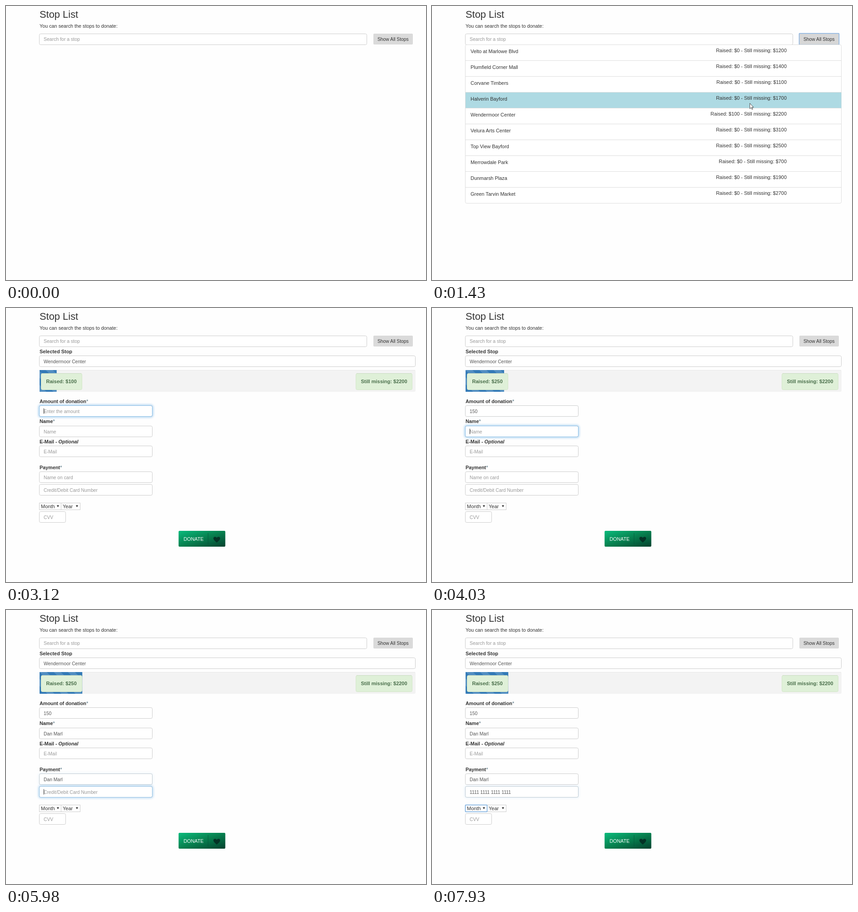
An HTML page that plays this animation: 926 by 605 pixels, repeating every 8000 ms.

```html
<!DOCTYPE html>
<html lang="en">
<head>
<meta charset="utf-8">
<title>Stop List</title>
<style>
  html, body { margin: 0; width: 100%; height: 100%; overflow: hidden; background: #fefefe; }
  svg { display: block; width: 926px; height: 605px; font-family: "Liberation Sans", Arial, sans-serif; }
</style>
</head>
<body>
<svg id="stage" viewBox="0 0 926 605" xmlns="http://www.w3.org/2000/svg">
  <defs>
    <pattern id="stripes" width="31" height="31" patternUnits="userSpaceOnUse">
      <rect width="31" height="31" fill="#337ab7"/>
      <rect width="15.5" height="31" fill="#fff" opacity=".15"/>
    </pattern>
    <linearGradient id="green" x1="0" y1="0" x2="1" y2="1">
      <stop offset="0" stop-color="#0bbb7c"/>
      <stop offset=".5" stop-color="#07804f"/>
      <stop offset="1" stop-color="#04412e"/>
    </linearGradient>
    <filter id="glow" x="-10%" y="-50%" width="120%" height="200%">
      <feGaussianBlur stdDeviation="2"/>
    </filter>
  </defs>
</svg>
<script>
const LOOP = 8000, STEP = 130;
const CLICK_SHOW = 520, CLICK_STOP = 1950, RAISE = 3708;
const stage = document.getElementById('stage');

function el(parent, tag, attrs, content) {
  const node = document.createElementNS('http://www.w3.org/2000/svg', tag);
  for (const k in attrs) node.setAttribute(k, attrs[k]);
  if (content !== undefined) node.textContent = content;
  parent.appendChild(node);
  return node;
}
const group = () => el(stage, 'g', {});
const text = (g, x, y, size, content, fill = '#333', more = {}) =>
  el(g, 'text', { x, y, 'font-size': size, fill, ...more }, content);
const bold = (g, x, y, size, content, fill = '#333') =>
  text(g, x, y, size, content, fill, { 'font-weight': 'bold' });
const rect = (g, x1, y1, x2, y2, fill, more = {}) =>
  el(g, 'rect', { x: x1, y: y1, width: x2 - x1, height: y2 - y1, fill, ...more });
const box = (g, x1, y1, x2, y2, stroke = '#ccc', rx = 3) =>
  rect(g, x1, y1, x2, y2, '#fff', { stroke, rx });
const show = (node, on) => node.setAttribute('display', on ? 'inline' : 'none');

// Header
const head = group();
text(head, 74, 26, 21.9, 'Stop List');
text(head, 74, 48, 10.8, 'You can search the stops to donate:');
box(head, 73.5, 61.5, 795.5, 85.5);
text(head, 83, 77, 10.5, 'Search for a stop', '#999');
rect(head, 810, 61, 897, 85, '#dadada', { rx: 2 });
const ring = rect(head, 809.5, 60.5, 897.5, 85.5, '#d7d7d7', { rx: 1, stroke: '#82aee0', 'stroke-width': 1.4 });
text(head, 819, 77, 10.3, 'Show All Stops');

// Stop list
const stops = [
  ['Velto at Marlowe Blvd', 0, 1200], ['Plumfield Corner Mall', 0, 1400],
  ['Corvane Timbers', 0, 1100], ['Halverin Bayford', 0, 1700],
  ['Wendermoor Center', 100, 2200], ['Velura Arts Center', 0, 3100],
  ['Top View Bayford', 0, 2500], ['Merrowdale Park', 0, 700],
  ['Dunmarsh Plaza', 0, 1900], ['Green Tarvin Market', 0, 2700]
];
const ROW = 35, TOP = 86;
const list = group();
box(list, 73.5, 85.5, 902.5, 435.5, '#ddd');
const hover = rect(list, 74, TOP, 902.5, TOP + ROW, '#aedae3');
stops.forEach(([name, raised, missing], i) => {
  const y = TOP + i * ROW;
  if (i) rect(list, 74, y - 1, 902, y, '#ddd');
  text(list, 85, y + 18, 10.95, name);
  text(list, 782, y + 16, 10.92, `Raised: $${raised} - Still missing: $${missing}`, '#333', { 'text-anchor': 'end' });
});

// Donation form
const form = group();
bold(form, 74, 100, 10.9, 'Selected Stop');
box(form, 73.5, 105.5, 902.5, 129.5);
text(form, 83, 122, 10.3, stops[4][0], '#555');

rect(form, 74, 137, 903, 185, '#f3f3f3', { rx: 3 });
rect(form, 75, 137, 902, 138, '#e6e6e6');
const bar = rect(form, 74, 137, 112, 185, 'url(#stripes)');
const badge = (x1, x2, label) => {
  rect(form, x1 + .5, 144.5, x2 - .5, 180.5, '#dff0d8', { rx: 3, stroke: '#d3e6c8' });
  rect(form, x1 + 2, 144, x2 - 2, 145, '#c9dbc0');
  return bold(form, x1 + 11.5, 166, 11, label, '#4a6f4b');
};
const raisedText = badge(77, 168, '');
badge(771, 896, 'Still missing: $2200');

const label = (y, content, mark, more) => {
  const t = bold(form, 74, y, 10.85, content);
  el(t, 'tspan', more, mark);
};
const star = { 'font-weight': 'normal', fill: '#4a6a7a' };
label(210, 'Amount of donation', '*', star);
label(254, 'Name', '*', star);
label(299, 'E-Mail - ', 'Optional', { 'font-style': 'italic' });
label(355.5, 'Payment', '*', star);

const DONOR = 'Dan Marl';
// at: first key, gap: time between keys, on/off: focus span
const fields = [
  { y: 215.5, hint: 'Enter the amount', value: '150', at: 3280, gap: 200, on: 2730, off: 3900 },
  { y: 260.5, hint: 'Name', value: DONOR, at: 4300, gap: 85, on: 3900, off: 5000 },
  { y: 304.5, hint: 'E-Mail', value: '', at: LOOP, gap: 1, on: 5000, off: 5150 },
  { y: 361.5, hint: 'Name on card', value: DONOR, at: 5250, gap: 75, on: 5150, off: 5900 },
  { y: 389.5, hint: 'Credit/Debit Card Number', value: '1111 1111 1111 1111', at: 6720, gap: 50, on: 5900, off: 7860 }
];
for (const f of fields) {
  const b = f.y + 24;
  f.glow = rect(form, 73, f.y - .5, 323, b + .5, 'none', { rx: 4, stroke: '#7ab8e8', 'stroke-width': 4, filter: 'url(#glow)' });
  box(form, 73.5, f.y, 322.5, b);
  f.edge = rect(form, 73.5, f.y, 322.5, b, 'none', { rx: 3, stroke: '#86bce6' });
  f.text = text(form, 83, f.y + 16, 10.3, '');
  f.caret = rect(form, 83, f.y + 6, 84, f.y + 18, '#333');
}

box(form, 73.5, 430.5, 121.5, 445.5, '#ccc', 0);
box(form, 121.5, 430.5, 163.5, 445.5, '#ccc', 0);
const monthRing = rect(form, 73.5, 430.5, 121.5, 445.5, 'none', { stroke: '#6fa6dc', 'stroke-width': 1.5, rx: 1 });
text(form, 77, 442, 11, 'Month');
text(form, 125, 442, 11, 'Year');
for (const x of [112, 154]) el(form, 'path', { d: `M${x} 435.5h5l-2.5 4.5z`, fill: '#333' });
box(form, 73.5, 449.5, 131.5, 473.5);
text(form, 83, 465.5, 10.3, 'CVV', '#999');

rect(form, 380.5, 492, 483.5, 527, 'url(#green)', { rx: 2 });
rect(form, 445, 497, 446, 522, '#04553a', { opacity: .7 });
text(form, 391.5, 513.5, 10.8, 'DONATE', '#fff');
el(form, 'path', { d: 'M464.7 518C461 514.6 457.3 512 457.3 508.6C457.3 504.6 462.6 504 464.7 507.4C466.8 504 472.1 504.6 472.1 508.6C472.1 512 468.4 514.6 464.7 518Z', fill: '#043326' });

// Pointer
const pointer = el(stage, 'path', { d: 'M0 0V12L2.8 9.4L4.8 13.6L6.5 12.8L4.6 8.8H8.2Z', fill: '#fff', stroke: '#333', 'stroke-width': .9 });
const path = [
  [130, 862, 104], [390, 853, 74], [620, 851, 76], [1040, 746, 173],
  [1300, 722, 206], [1690, 640, 240], [1950, 599, 242], [2600, 182, 227], [2990, 180, 228]
];
function pointerAt(t) {
  let i = 0;
  while (i < path.length - 2 && t >= path[i + 1][0]) i++;
  const [t0, x0, y0] = path[i], [t1, x1, y1] = path[i + 1];
  const p = Math.min(1, Math.max(0, (t - t0) / (t1 - t0)));
  const k = p * p * (3 - 2 * p);
  return [x0 + (x1 - x0) * k, y0 + (y1 - y0) * k];
}

const clamp = v => Math.min(1, Math.max(0, v));
const bezier = (a, b, s) => 3 * a * s * (1 - s) ** 2 + 3 * b * s * s * (1 - s) + s ** 3;
function ease(p) {
  let lo = 0, hi = 1;
  for (let i = 0; i < 20; i++) {
    const s = (lo + hi) / 2;
    if (bezier(.25, .25, s) < p) lo = s; else hi = s;
  }
  return bezier(.1, 1, lo);
}

function drawField(f, t) {
  const n = t < f.at ? 0 : Math.min(f.value.length, 1 + Math.floor((t - f.at) / f.gap));
  f.text.textContent = n ? f.value.slice(0, n) : f.hint;
  f.text.setAttribute('fill', n ? '#555' : '#999');
  const focus = ease(clamp((t - f.on) / 150)) * (1 - ease(clamp((t - f.off) / 150)));
  f.glow.setAttribute('opacity', focus * .6);
  f.edge.setAttribute('opacity', focus);
  const lastKey = n ? f.at + (n - 1) * f.gap : f.on;
  show(f.caret, t >= f.on && t < f.off && (t - lastKey) % 1060 < 530);
  f.caret.setAttribute('x', 83 + (n ? f.text.getComputedTextLength() : 0));
}

function draw(t) {
  const listed = t >= CLICK_SHOW && t < CLICK_STOP, open = t >= CLICK_STOP;
  show(list, listed);
  show(ring, listed);
  show(form, open);

  const [x, y] = pointerAt(t);
  show(pointer, t >= 130 && t < 2990);
  pointer.setAttribute('transform', `translate(${x} ${y})`);
  const row = Math.floor((y - TOP) / ROW);
  show(hover, listed && row >= 0);
  hover.setAttribute('y', TOP + row * ROW);
  if (!open) return;

  const raised = 100 + 150 * ease(clamp((t - RAISE) / 600));
  bar.setAttribute('width', raised / 2200 * 829);
  raisedText.textContent = `Raised: $${t < RAISE ? 100 : 250}`;
  document.getElementById('stripes').setAttribute('patternTransform',
    `translate(${74 - t % 2000 / 2000 * 31} 137) skewX(45)`);
  fields.forEach(f => drawField(f, t));
  show(monthRing, t >= 7860);
}

const start = performance.now();
function tick() {
  const t = (performance.now() - start) % LOOP;
  draw(Math.floor(t / STEP) * STEP);
  requestAnimationFrame(tick);
}
tick();
</script>
</body>
</html>
```
